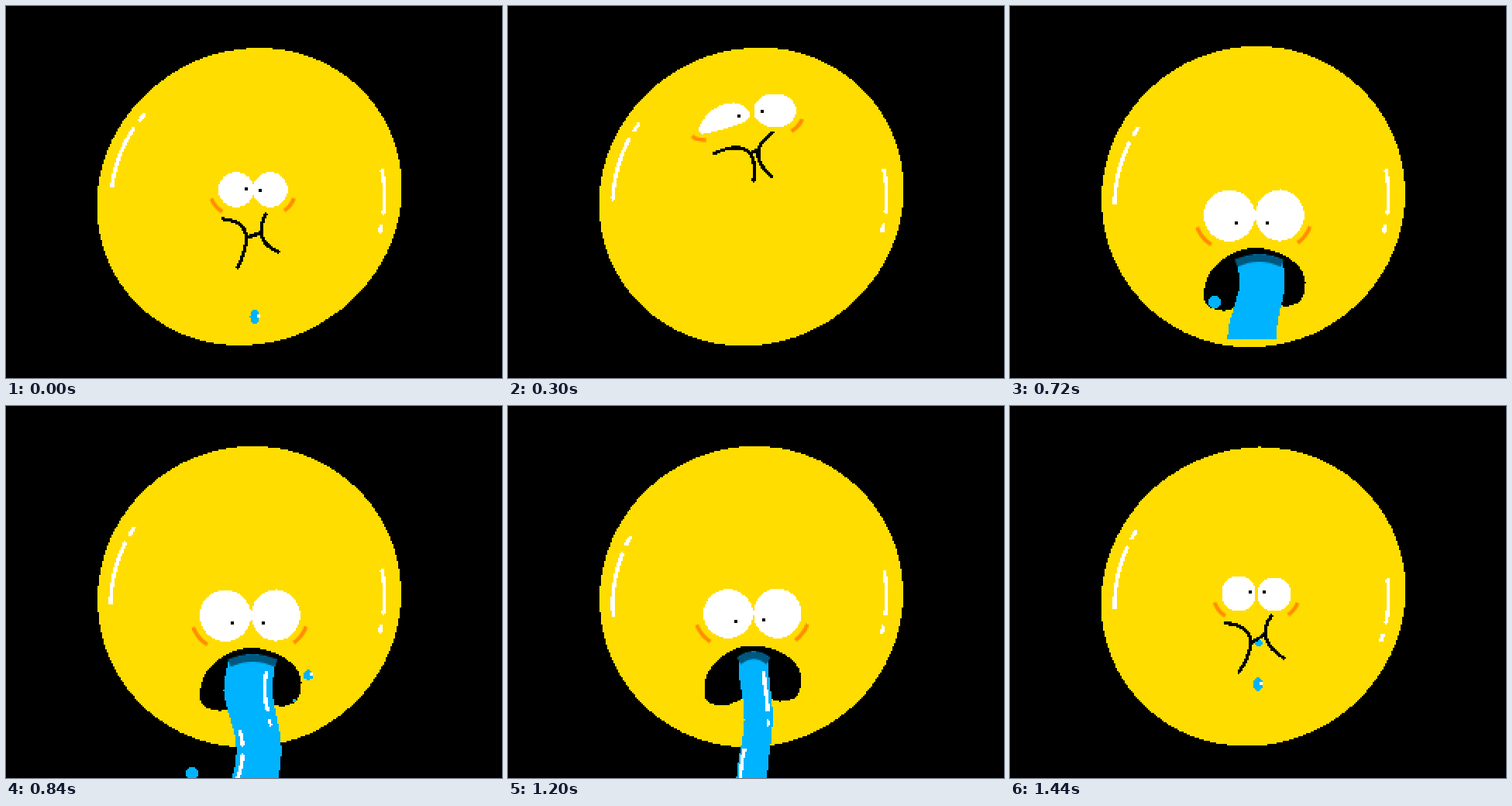
An HTML page with a canvas for the animation above (1500 ms loop, 640 px wide and 480 px high).

```html
<!DOCTYPE html>
<html lang="en">
<head>
<meta charset="utf-8">
<title>Queasy face</title>
<style>
html, body { margin: 0; width: 100%; height: 100%; overflow: hidden; background: #000; }
canvas { display: block; width: 640px; height: 480px; image-rendering: pixelated; }
</style>
</head>
<body>
<canvas id="stage" width="320" height="240"></canvas>
<script>
const STEP = 60, STEPS = 25;
const BLACK = '#000000', YELLOW = '#ffdd00', WHITE = '#ffffff', BLUE = '#00b3ff';
const ORANGE = '#ff8c00', TEAL = '#00587f';
const PALETTE = [BLACK, YELLOW, WHITE, BLUE].map(c => [1, 3, 5].map(i => parseInt(c.slice(i, i + 2), 16)));
const CX = 314, CY = 246, DEG = Math.PI / 180;

const ctx = document.getElementById('stage').getContext('2d', { willReadFrequently: true });
ctx.lineJoin = 'round';

const pts = s => s.split(' ').map(p => p.split(',').map(Number));
const sweep = (from, to, n, f) => Array.from({ length: n + 1 }, (_, i) => f(from + (to - from) * i / n));
const ring = (n, f) => sweep(0, 360 - 360 / n, n - 1, f);
const polar = (r, deg) => [CX + r * Math.cos(deg * DEG), CY + r * Math.sin(deg * DEG)];

// eyes: x, y, rx, ry, droop; lips: start, control, end; mouth: x, y, scale; shine: start angles
const full = {
  tilt: 6, shine: [218, -11],
  eyes: [[297, 237, 23, 22.5, 0], [341, 237, 22.5, 22.5, 0]], pupils: pts('309,236 328,237'),
  lips: [pts('280,275 328,278 299,337'), pts('335,269 318,303 351,317')]
};
const raised = {
  tilt: 5, shine: [212.6, -11.3],
  eyes: [[279, 142.5, 33, 16, 10], [344.5, 135, 27.5, 22, 0]], pupils: pts('298,141 327,136'),
  lips: [pts('266,190 325,165 317,225'), pts('342,163 304,190 341,220')]
};
const gulp = {
  tilt: 2.4, shine: [211.7, -10],
  eyes: [[278, 139, 32, 15.5, 9], [342, 128, 27, 22, 0]], pupils: pts('301,134 325,130'),
  lips: [pts('269,180 322,145 317,216'), pts('335,152 299,179 339,210')],
  mouth: [318, 185, 0.6]
};
const gush = {
  tilt: 2, shine: [210.7, -11],
  eyes: [[283, 270.5, 33, 33, 0], [348, 270, 31.5, 33, 0]], pupils: pts('292,280 332,280'),
  mouth: [316, 352, 1]
};
const gushEnd = { ...gush, shine: [205.7, -11], pupils: pts('294,279 330,278') };
const drip = {
  tilt: 2.6, shine: [205.9, -9.5],
  eyes: [[287, 261, 29, 27, 0], [347, 260, 29.5, 28.5, 0]], pupils: pts('296,275 332,271'),
  mouth: [317, 334, 0.85]
};
const shut = {
  tilt: 4.5, shine: [208.8, -7.1],
  eyes: [[295, 242, 22, 23, 0], [341, 243, 22, 22, 0]], pupils: pts('309,240 328,239'),
  lips: [pts('278,280 333,286 295,344'), pts('337,271 316,302 353,325')],
  mouth: [318, 312, 0.5]
};
const keys = [[0, full], [5, raised], [9, gulp], [10, gulp], [12, gush], [14, gush],
              [18, gushEnd], [19, gushEnd], [22, drip], [24, shut]];
const mouthShape = pts('-1,-40 29,-34 55,-18 65,4 58,29 35,35 10,25 -15,32 -38,41 -62,34 -65,12 -56,-11 -31,-32');

function mix(a, b, u) {
  if (a === undefined) return b;
  if (b === undefined) return a;
  return typeof a === 'number' ? a + (b - a) * u : a.map((v, i) => mix(v, b[i], u));
}

function poseAt(k) {
  let i = 0;
  while (i < keys.length - 2 && keys[i + 1][0] <= k) i++;
  const [ta, a] = keys[i], [tb, b] = keys[i + 1];
  const s = (k - ta) / (tb - ta), u = s * s * (3 - 2 * s), pose = {};
  for (const name of ['tilt', 'shine', 'eyes', 'pupils', 'lips', 'mouth']) pose[name] = mix(a[name], b[name], u);
  return pose;
}

// Smooth curve through points
function trace(p, closed) {
  const n = p.length;
  const at = i => closed ? p[(i + n) % n] : p[Math.max(0, Math.min(n - 1, i))];
  ctx.beginPath();
  ctx.moveTo(...p[0]);
  for (let i = 0; i < (closed ? n : n - 1); i++) {
    const [a, b, c, d] = [at(i - 1), at(i), at(i + 1), at(i + 2)];
    ctx.bezierCurveTo(b[0] + (c[0] - a[0]) / 6, b[1] + (c[1] - a[1]) / 6,
                      c[0] - (d[0] - b[0]) / 6, c[1] - (d[1] - b[1]) / 6, ...c);
  }
}
function fill(p, color) { trace(p, true); ctx.fillStyle = color; ctx.fill(); }
function line(p, color, width, cap = 'round') {
  trace(p, false);
  ctx.strokeStyle = color;
  ctx.lineWidth = width;
  ctx.lineCap = cap;
  ctx.stroke();
}
function square(x, y, color) {
  const snap = v => Math.round(v / 2) * 2 - 2;
  ctx.fillStyle = color;
  ctx.fillRect(snap(x), snap(y), 4, 4);
}
function drop(x, y, rx, ry, glint) {
  fill(ring(12, a => [x + rx * Math.cos(a * DEG), y + ry * Math.sin(a * DEG)]), BLUE);
  if (glint) square(x + 4, y - 1, WHITE);
}

function drawBall({ tilt, shine: [a, b] }) {
  fill(ring(40, d => polar(195.5 - tilt * (0.25 + Math.sin(2 * d * DEG) - 0.4 * Math.cos(2 * d * DEG)), d)), YELLOW);
  const left = d => polar(179.5 - 0.17 * (d - 174), d), right = d => polar(174.5, d);
  line(sweep(a, a - 3, 2, left), WHITE, 5);
  line(sweep(a - 7.5, a - 33.5, 6, left), WHITE, 5);
  line(sweep(b, b + 18, 6, right), WHITE, 5);
  line(sweep(b + 23.6, b + 26, 2, right), WHITE, 5);
}

// Eye rim at an angle; droop bends the eye down on its left side
const rim = ([x, y, rx, ry, droop], grow) => deg => {
  const u = Math.cos(deg * DEG);
  return [x + (rx + grow) * u, y + (ry + grow) * Math.sin(deg * DEG) + droop * (0.75 * u * u - u)];
};

function drawLips(lips) {
  const [l, r] = lips.map(([a, c, b]) => t =>
    [0, 1].map(i => (1 - t) ** 2 * a[i] + 2 * t * (1 - t) * c[i] + t * t * b[i]));
  line(sweep(0, 1, 8, l), BLACK, 4.5);
  line(sweep(0, 1, 8, r), BLACK, 4.5);
  line([l(0.6), r(0.4)], BLACK, 4.5);
}

// Wavy flow that thins to a drip
function flowAt(k, top) {
  const w = Math.min(1, 1 - (k - 18) * 0.185), crest = 360 + 49.5 * (k - 14);
  const edge = (x, amp) => y =>
    318 + (x - amp * Math.min(1, (y - 300) / 60) * Math.cos((y - crest) * Math.PI / 85) - 318) * w;
  const end = k < 13 ? 430 : k < 22 ? 484 : 398 - 50 * (k - 22);
  return { w, top, end, left: edge(289, 8.5), right: edge(349.5, 6) };
}
function cap({ top, left, right }) {
  const l = left(top + 8), r = right(top + 8);
  return sweep(0, 1, 4, t => [l + (r - l) * t, top + 9 - 28 * t * (1 - t)]);
}
function drawFlow(flow, k) {
  const { w, top, end, left, right } = flow;
  const run = (f, from, to, off = 0) => sweep(from, to, 8, y => [f(y) + off, y]);
  ctx.beginPath();
  [...cap(flow), ...run(right, top + 10, end), ...run(left, end, top + 10)].forEach(p => ctx.lineTo(...p));
  ctx.fillStyle = BLUE;
  ctx.fill();
  if (end < 420) {
    drop(314, end - 12, 32 * w, 14);
    line([[317, end - 40], [317, end - 17]], WHITE, 4);
  } else if (k > 12) {
    const low = k % 4 === 2 ? 420 : 444;
    line(run(right, 344, 392, -10 * w), WHITE, 5);
    line(run(right, 406, 412, -10 * w), WHITE, 4);
    line(run(left, low, 2 * low / 3 + 157, 8 * w), WHITE, 5);
    line(run(left, low / 4 + 346, 484, 8 * w), WHITE, 5);
  }
}

function drawSplashes(k) {
  const j = k - 14;
  if (j >= -1 && j < 5) drop(390 + 15.75 * j, 347 + 7 * j * j, 6.5, 6.5, true);
  if (j >= 0 && j < 4) drop(372 + 20 * j, 380 + 10 * j + 6 * j * j, 2.5, 2.5);
  if (j >= -2 && j <= 0) drop(240 - 12 * j, 474 + 56 * j + 5 * j * j, 8, 8);
  if (k === 22 || k === 23) {
    const y = 439 + 45 * (k - 22);
    drop(318, y, 8, 20);
    line([[320, y - 8], [320, y + 6]], WHITE, 5);
  }
  // Last drops fall on across the loop point
  const late = (k + 1) % STEPS;
  if (late < 3) drop(320 + late, 359 + 42 * late + 4 * late * (late - 1), 6, 9, true);
  if (late === 0) drop(321, 306, 4.5, 4);
}

// Reduce soft edges to the flat palette
function flatten() {
  const img = ctx.getImageData(0, 0, 320, 240), d = img.data;
  for (let i = 0; i < d.length; i += 4) {
    let best = Infinity, pick;
    for (const c of PALETTE) {
      const e = (d[i] - c[0]) ** 2 + (d[i + 1] - c[1]) ** 2 + (d[i + 2] - c[2]) ** 2;
      if (e < best) { best = e; pick = c; }
    }
    d.set(pick, i);
  }
  ctx.putImageData(img, 0, 0);
}

function draw(k) {
  const pose = poseAt(k), open = k > 10 && k < 24;
  let flow;
  ctx.setTransform(0.5, 0, 0, 0.5, 0, 0);
  ctx.fillStyle = BLACK;
  ctx.fillRect(0, 0, 640, 480);
  drawBall(pose);
  pose.eyes.forEach(e => fill(ring(16, rim(e, 0)), WHITE));
  pose.pupils.forEach(([x, y]) => square(x, y, BLACK));
  if (open) {
    const [x, y, s] = pose.mouth;
    fill(mouthShape.map(p => [x + p[0] * s, y + p[1] * s]), BLACK);
    if (k > 11) drawFlow(flow = flowAt(k, y - 34 * s), k);
  }
  drawSplashes(k);
  if (!open) drawLips(pose.lips);
  flatten();
  line(sweep(160, 122, 4, rim(pose.eyes[0], 11)), ORANGE, 5, 'butt');
  line(sweep(20, 56, 4, rim(pose.eyes[1], 10)), ORANGE, 5, 'butt');
  if (flow) line(cap(flow).map(([x, y]) => [x, y + 5]), TEAL, 10, 'butt');
}

let shown = -1;
function tick() {
  const k = Math.floor(performance.now() / STEP) % STEPS;
  if (k !== shown) draw(shown = k);
  requestAnimationFrame(tick);
}
tick();
</script>
</body>
</html>
```
